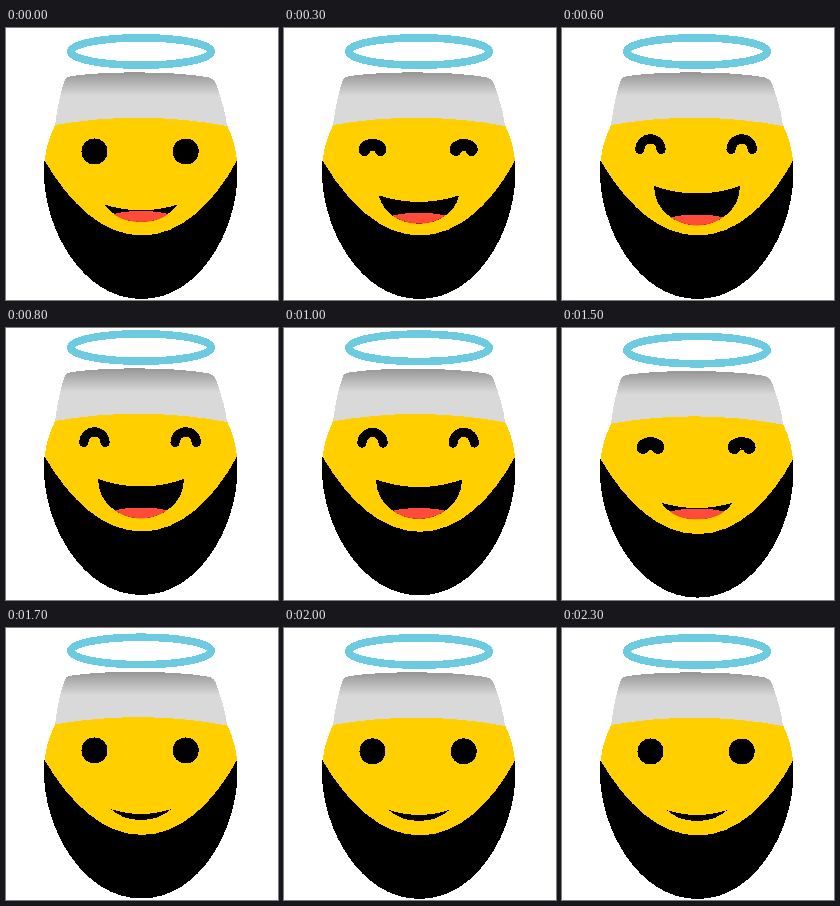
Animation of 272x272 px, one loop 2.5 s. Source, as an HTML page:

```html
<!DOCTYPE html>
<html lang="en">
<head>
<meta charset="utf-8">
<title>Laughing halo face</title>
<style>
html, body { margin: 0; width: 100%; height: 100%; overflow: hidden; background: #fff; }
svg { display: block; width: 100%; height: 100%; shape-rendering: crispEdges; }
.eye { fill: none; stroke: #000; stroke-linecap: round; }
</style>
</head>
<body>
<svg viewBox="0 0 272 272">
  <defs>
    <linearGradient id="shade" gradientUnits="userSpaceOnUse" x1="0" y1="44" x2="0" y2="68">
      <stop offset="0" stop-color="#959595"/>
      <stop offset="1" stop-color="#d9d9d9"/>
    </linearGradient>
    <clipPath id="lips"><path id="lipShape"/></clipPath>
  </defs>
  <g id="head">
    <ellipse cx="135" cy="23.5" rx="70.3" ry="13.7" fill="none" stroke="#6dcbe1" stroke-width="7.6"/>
    <path fill="#ffcf00" d="M49 97C42 112 38 125 38 145C38 200 76 271 135.500 271C195 271 231.500 200 231.500 145C231.500 125 228 112 221 97Q135 70 49 97"/>
    <path d="M38.500 132.500C64 176 97 207.500 136 207.500C175 207.500 208 175 231 132.500Q231.500 138 231.500 145C231.500 200 195 271 135.500 271C76 271 38 200 38 145Q38 138 38.500 132.500"/>
    <path fill="url(#shade)" d="M49 97C51 80 55 62 59 52Q60 49 66 48C100 43 165 43 201 49Q208 50 210 56C215 70 220 85 221 98Q135 82 49 97"/>
  </g>
  <g id="face">
    <path class="eye" transform="translate(88.500 123.500)"/>
    <path class="eye" transform="translate(179.700 123.500)"/>
    <g transform="translate(135 0)">
      <path id="mouth"/>
      <ellipse id="tongue" rx="36" ry="9" fill="#ff4b3a" clip-path="url(#lips)"/>
    </g>
  </g>
</svg>
<script>
const $ = id => document.getElementById(id);
const eyes = document.querySelectorAll('.eye');

const mix = (a, b, k) => a + (b - a) * k;
const part = (t, from, to) => Math.min(1, Math.max(0, (t - from) / (to - from)));
const ease = k => (1 - Math.cos(Math.PI * k)) / 2;

// A round dot at 0 that bends into a thin arch at 1
function drawEyes(e) {
  const bend = e ** 4, width = mix(26, 9.2, e);
  const rx = Math.max(.01, 13 + 2.2 * bend - width / 2);
  const ry = Math.max(.01, 10.6 * bend);
  for (const eye of eyes) {
    eye.setAttribute('d', `M${-rx} ${-2 * e}A${rx} ${ry} 0 0 1 ${rx} ${-2 * e}`);
    eye.setAttribute('stroke-width', width);
  }
}

// A thin smile at 0, wide open at 1
function drawMouth(m) {
  const w = mix(30.5, 43, Math.sqrt(m));
  const corner = mix(182, 158, m), lip = mix(187, 165.5, m), chin = mix(193, 197.5, m);
  const side = w * mix(.72, 1, m), low = mix(corner, chin, .62), bow = w * .48;
  const d = `M${-w} ${corner}Q0 ${2 * lip - corner} ${w} ${corner}` +
    `C${side} ${low} ${bow} ${chin} 0 ${chin}` +
    `C${-bow} ${chin} ${-side} ${low} ${-w} ${corner}`;
  $('mouth').setAttribute('d', d);
  $('lipShape').setAttribute('d', d);
  $('tongue').setAttribute('cy', chin + 9 - 11 * Math.min(1, 5 * m));
}

function draw() {
  const t = Math.min(2300, Math.floor(performance.now() % 2500 / 100) * 100);
  const open = part(t, 0, 600), close = part(t, 1200, 1700);

  drawMouth(mix(.22, 1, ease(open)) * (1 - close) ** 1.7);
  drawEyes((1 - (1 - open) ** 2.5) * (1 - close ** 3));

  const lift = 4 * ease(part(t, 600, 800)) * (1 - ease(part(t, 800, 2300))) ** 1.8;
  $('head').setAttribute('transform', `translate(0 ${-lift})`);
  $('face').setAttribute('transform', `translate(0 ${-lift * 1.75})`);
  requestAnimationFrame(draw);
}
draw();
</script>
</body>
</html>
```
